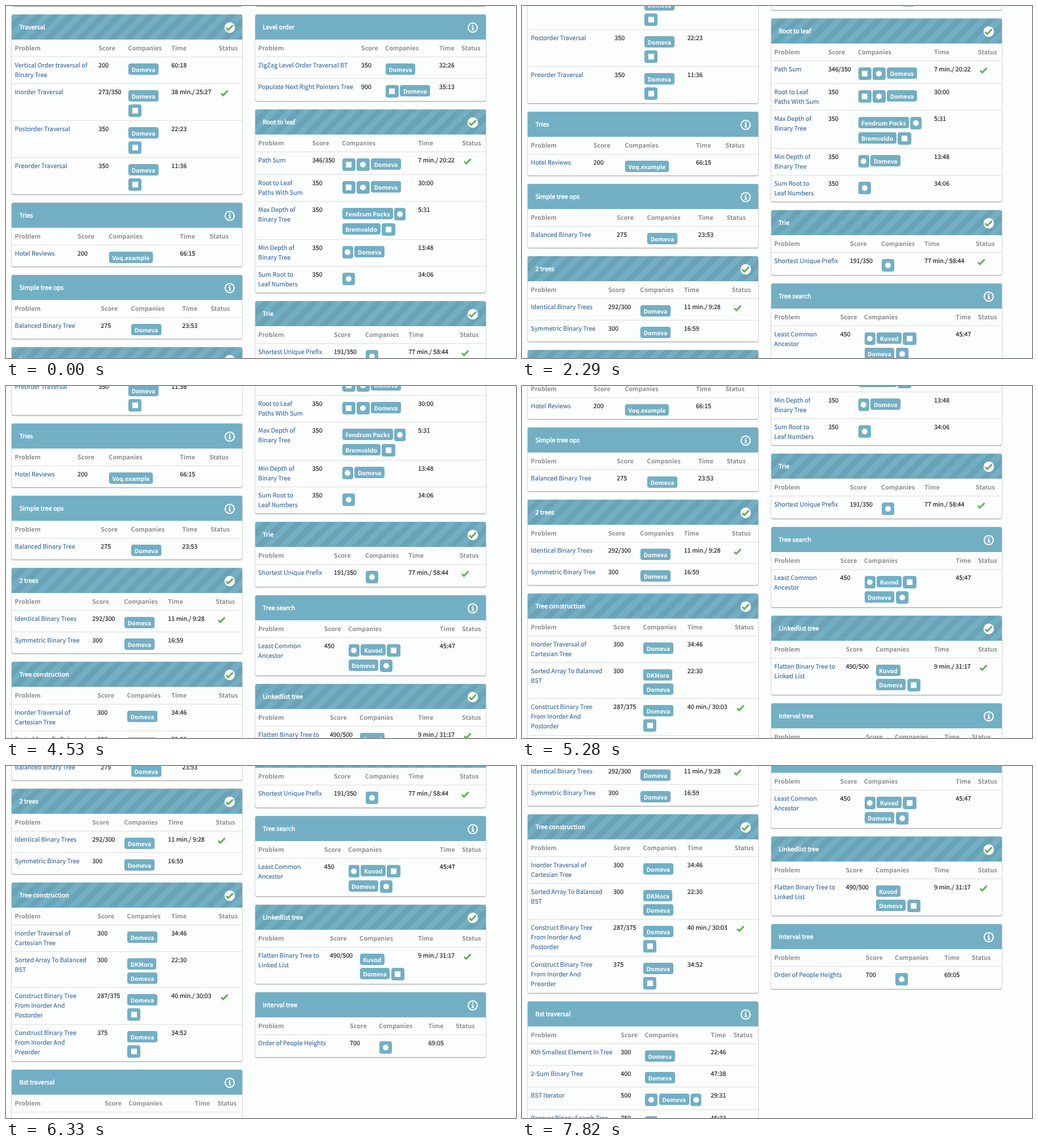
Animation of 896 by 619 pixels, one loop 8000 ms. Source, as an HTML page:

```html
<!DOCTYPE html>
<html lang="en">
<head>
<meta charset="utf-8">
<title>Problem list</title>
<style>
  html, body { margin: 0; width: 100%; height: 100%; overflow: hidden; background: #fcfdfd; }
  body {
    position: relative; color: #161616; white-space: nowrap;
    font: 10.74px/17px "Noto Sans CJK JP", "Noto Sans CJK SC", sans-serif;
    text-rendering: geometricPrecision; -webkit-text-stroke: .15px;
  }
  #page { position: absolute; inset: 0; animation: scroll 8s step-end infinite; }
  .column { position: absolute; top: -105px; width: 405px; }
  .card {
    margin-bottom: 15px; border-radius: 3px; overflow: hidden; background: #fcfdfd;
    box-shadow: 0 0 1px rgba(0,0,0,.45), 0 1px 2px rgba(0,0,0,.4);
  }
  .card:first-child { height: 105px; }
  .title { position: relative; height: 44px; background: #73afc4; color: #fff; -webkit-text-stroke: .5px; }
  .done .title {
    background-image: repeating-linear-gradient(135deg, transparent 0 10px, rgba(70,110,125,.2) 10px 20px);
  }
  .title b { position: absolute; left: 13.4px; top: 14px; font-weight: 400; }
  .title svg { position: absolute; left: 372.5px; top: 13px; }
  .row { position: relative; box-sizing: border-box; }
  .row + .row { border-top: 1px solid #dcdddd; }
  .row > * { position: absolute; top: 7px; margin-left: -.4px; }
  .row + .row > * { top: 6px; }
  .head { height: 30px; color: #8e8e8e; font-weight: 700; -webkit-text-stroke: 0; }
  .link { left: 6px; color: #3a6ba0; }
  .row + .row > .badges { top: 11px; margin: 0; }
  .row + .row > .tick { top: 6px; margin: 0; }
  .line { display: flex; gap: 2.4px; height: 25px; align-items: flex-start; }
  .line.tall { height: 27px; }
  .badge {
    height: 20px; padding: 0 5.7px; border-radius: 4px; background: #73afc4; color: #fff;
    font-size: 10.3px; line-height: 21px; font-weight: 700; -webkit-text-stroke: 0;
  }
  .mark { display: grid; place-items: center; width: 22.4px; height: 22px; border-radius: 4px; background: #73afc4; }
  .mark i { width: 10px; height: 10px; border-radius: 50%; background: #fff; }
  .mark.square { width: 23.4px; }
  .mark.square i { border-radius: 0; }
  .mark.slim { width: 19.4px; }
  @keyframes scroll {
    0% { top: 0; }
    6.25% { top: -40px; }
    10% { top: -80px; }
    19.375% { top: -120px; }
    28.625% { top: -160px; }
    43.625% { top: -200px; }
    51% { top: -220px; }
    52.875% { top: -240px; }
    56.625% { top: -280px; }
    58.5% { top: -320px; }
    60.375% { top: -360px; }
    66% { top: -400px; }
    69.75% { top: -440px; }
    73.5% { top: -480px; }
    75.375% { top: -520px; }
    79.125% { top: -560px; }
    84.75% { top: -600px; }
    88.5% { top: -640px; }
    97.75%, 100% { top: -680px; }
  }
</style>
</head>
<body>
<div id="page"></div>
<script>
const companies = {
  D: 'Domeva', F: 'Fendrum Pocks', B: 'Bremvoldo', V: 'Voq.example', K: 'Kuvod', M: 'DKMora'
};
const marks = { s: 'square', t: 'slim', c: '' };

// Card: title, solved, [score, companies, time, status] offsets, rows.
// Row: problem, score, badge codes, time, solved. "|" breaks a line.
const left = [
  ['Traversal', 1, [153, 205, 281, 364], [
    ['Vertical Order traversal of|Binary Tree', '200', 'D', '60:18'],
    ['Inorder Traversal', '273/350', 'D|s', '38 min./ 25:27', 1],
    ['Postorder Traversal', '350', 'D|s', '22:23'],
    ['Preorder Traversal', '350', 'D|s', '11:36']]],
  ['Tries', 0, [116, 171, 296, 348], [
    ['Hotel Reviews', '200', 'V', '66:15']]],
  ['Simple tree ops', 0, [157, 210, 300, 350], [
    ['Balanced Binary Tree', '275', 'D', '23:53']]],
  ['2 trees', 1, [142, 198, 275, 359], [
    ['Identical Binary Trees', '292/300', 'D', '11 min./ 9:28', 1],
    ['Symmetric Binary Tree', '300', 'D', '16:59']]],
  ['Tree construction', 1, [151, 203, 281, 364], [
    ['Inorder Traversal of|Cartesian Tree', '300', 'D', '34:46'],
    ['Sorted Array To Balanced|BST', '300', 'M|D', '22:30'],
    ['Construct Binary Tree|From Inorder And|Postorder', '287/375', 'D|s', '40 min./ 30:03', 1],
    ['Construct Binary Tree|From Inorder And|Preorder', '375', 'D|s', '34:52']]],
  ['Bst traversal', 0, [164, 206, 322, 362], [
    ['Kth Smallest Element In Tree', '300', 'D', '22:46'],
    ['2-Sum Binary Tree', '400', 'D', '47:38'],
    ['BST Iterator', '500', 'cDt', '29:31'],
    ['Recover Binary Search Tree', '750', 'c', '45:33']]]
];
const right = [
  ['Level order', 0, [187, 229, 324, 363], [
    ['ZigZag Level Order Traversal BT', '350', 'D', '32:26'],
    ['Populate Next Right Pointers Tree', '900', 'sD', '35:13']]],
  ['Root to leaf', 1, [101, 153, 287, 364], [
    ['Path Sum', '346/350', 'scD', '7 min./ 20:22', 1],
    ['Root to Leaf|Paths With Sum', '350', 'scD', '30:00'],
    ['Max Depth of|Binary Tree', '350', 'Ft|Bs', '5:31'],
    ['Min Depth of|Binary Tree', '350', 'tD', '13:48'],
    ['Sum Root to|Leaf Numbers', '350', 'c', '34:06']]],
  ['Trie', 1, [139, 194, 270, 360], [
    ['Shortest Unique Prefix', '191/350', 'c', '77 min./ 58:44', 1]]],
  ['Tree search', 0, [122, 164, 325, 364], [
    ['Least Common|Ancestor', '450', 'tKs|Dc', '45:47']]],
  ['Linkedlist tree', 1, [132, 184, 287, 364], [
    ['Flatten Binary Tree to|Linked List', '490/500', 'K|Ds', '9 min./ 31:17', 1]]],
  ['Interval tree', 0, [167, 218, 305, 353], [
    ['Order of People Heights', '700', 'c', '69:05']]]
];

const tickPath = '<path d="M4 10.6l3.6 3.5 8-8.2" fill="none" stroke="#66b158" stroke-width="3"/>';
const svg = (body, attrs = '') => `<svg width="20" height="20" ${attrs}>${body}</svg>`;
const solvedIcon = svg(`<circle cx="10" cy="10" r="9.2" fill="#fff"/>${tickPath}`);
const infoIcon = svg('<circle cx="10" cy="10" r="8" fill="none" stroke="#fff" stroke-width="2.1"/>' +
  '<path d="M8.8 4.9h2.6v2.2H8.8zM7.9 8.2h3.5v4.7h1.1v1.6H7.8v-1.6H9V9.8H7.9z" fill="#fff"/>');

const cell = (x, text) => `<span style="left:${x}px">${text}</span>`;
const badge = code => code in companies
  ? `<span class="badge">${companies[code]}</span>`
  : `<span class="mark ${marks[code]}"><i></i></span>`;
const isTall = line => /[a-z]/.test(line);
const badgeLine = line =>
  `<div class="line ${isTall(line) ? 'tall' : ''}">${[...line].map(badge).join('')}</div>`;

function row([problem, score, codes, time, solved], [scoreX, badgeX, timeX, statusX]) {
  const lines = codes.split('|');
  const badgeHeight = lines.reduce((sum, line) => sum + (isTall(line) ? 27 : 25), 0);
  const height = 13 + Math.max(badgeHeight, 17 * problem.split('|').length);
  return `<div class="row" style="height:${height}px">
    <span class="link">${problem.replaceAll('|', '<br>')}</span>
    ${cell(scoreX, score)}${cell(timeX, time)}
    <div class="badges" style="left:${badgeX}px">${lines.map(badgeLine).join('')}</div>
    ${solved ? svg(tickPath, `class="tick" style="left:${statusX - .5}px"`) : ''}
  </div>`;
}

function card([title, solved, cols, rows]) {
  const heads = ['Score', 'Companies', 'Time', 'Status'].map((name, i) => cell(cols[i], name));
  return `<div class="card ${solved ? 'done' : ''}">
    <div class="title"><b>${title}</b>${solved ? solvedIcon : infoIcon}</div>
    <div class="row head">${cell(6, 'Problem')}${heads.join('')}</div>
    ${rows.map(r => row(r, cols)).join('')}
  </div>`;
}

const column = (x, cards) =>
  `<div class="column" style="left:${x}px"><div class="card"></div>${cards.map(card).join('')}</div>`;

document.getElementById('page').innerHTML = column(10, left) + column(437.5, right);
</script>
</body>
</html>
```
